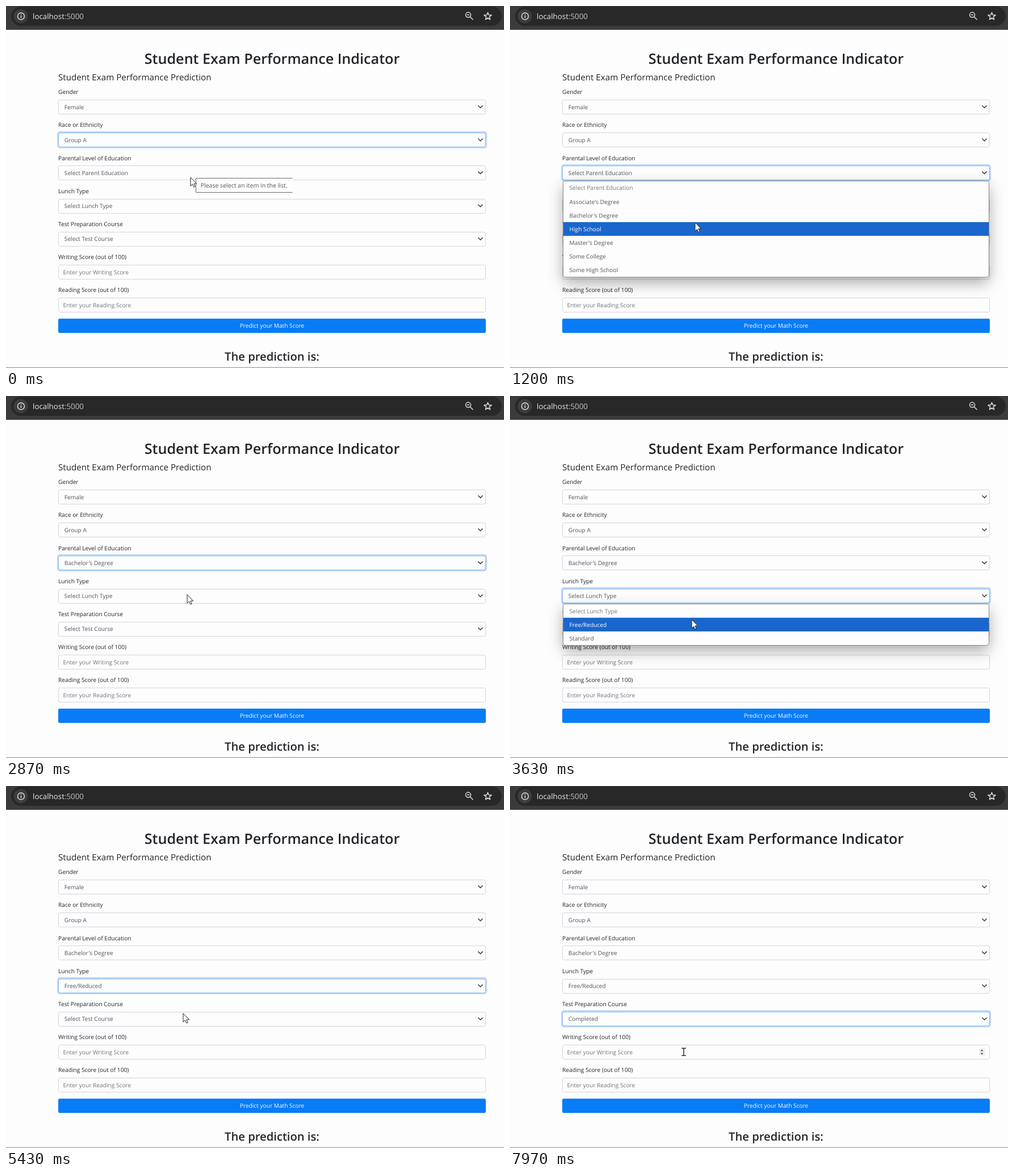
These frames come from a looping animation (877x638 px, 8 s). An HTML page:

```html
<!DOCTYPE html>
<html lang="en">
<head>
<meta charset="utf-8">
<title>Student Exam Performance Indicator</title>
<style>
  html, body { margin: 0; width: 100%; height: 100%; overflow: hidden; background: #fdfdfd; }
  svg { display: block; }
  text { font: 10.2px "Open Sans", "Noto Sans", sans-serif; fill: #212529; text-rendering: geometricPrecision; white-space: pre; }
  .title { font-size: 25.2px; font-weight: 600; text-anchor: middle; }
  .result { font-size: 20.2px; font-weight: 600; text-anchor: middle; }
  .subtitle { font-size: 15.17px; }
  .address { font-size: 13.35px; fill: #e6e6e6; }
  .port { fill: #c4c4c4; }
  .value { fill: #50565c; }
  .hint { fill: #6f757b; }
  .submit { fill: #f4f9ff; text-anchor: middle; }
  .tip { font-size: 10.54px; fill: #555; }
  .box { fill: #fdfdfd; stroke: #d3d5df; }
  .chevron { fill: none; stroke: #343a40; stroke-width: 1.5; stroke-linecap: round; stroke-linejoin: round; }
  .list { filter: drop-shadow(0 10px 13px rgba(0, 0, 0, .32)); }
</style>
</head>
<body>
<svg id="stage" width="877" height="638" viewBox="0 0 877 638">
  <defs><clipPath id="listClip"><path id="clipShape"/></clipPath></defs>

  <rect width="877" height="638" fill="#fdfdfd"/>
  <rect width="877" height="42" fill="#3b3b3d"/>
  <rect x="9" y="1" width="864" height="34" rx="17" fill="#282828"/>
  <circle cx="26" cy="18" r="12.5" fill="#3d3d3d"/>
  <g fill="none" stroke="#dedede" stroke-width="1.5">
    <circle cx="26.5" cy="18" r="6"/>
    <path d="M26.5 17v4.2M26.5 14.4v1.6"/>
    <circle cx="814" cy="15.6" r="4.5"/>
    <path d="M817.3 19l5.2 5.2M811.8 15.6h4.4"/>
    <path id="star" stroke-linejoin="round"/>
  </g>
  <text class="address" x="47" y="23">localhost<tspan class="port">:5000</tspan></text>

  <text class="title" x="468.5" y="102">Student Exam Performance Indicator</text>
  <text class="subtitle" x="92" y="131">Student Exam Performance Prediction</text>
  <g id="form"></g>
  <rect x="92" y="551" width="753" height="25.3" rx="2.7" fill="#087cf7"/>
  <text class="submit" x="468.5" y="567.3">Predict your Math Score</text>
  <text class="result" x="468.5" y="625">The prediction is:</text>
  <rect y="636.6" width="877" height="1.4" fill="#a9a9a9"/>

  <g id="spinner">
    <rect x="826" y="462.5" width="10.5" height="13" fill="#efefef"/>
    <path d="M828.6 467.2l2.4-2.8 2.4 2.8zM828.6 470.8l2.4 2.8 2.4-2.8z" fill="#444"/>
  </g>
  <g id="ring" fill="none">
    <rect x="91.3" y="-1.2" width="754.4" height="27.6" rx="3.6" stroke="#b9d8fd" stroke-width="2.4"/>
    <rect x="92.5" y=".5" width="752" height="24.6" rx="2.7" stroke="#86b9f7"/>
  </g>
  <g id="list"></g>
  <g id="tip">
    <rect x="334.5" y="303.5" width="170" height="25" fill="#fdfdfd"/>
    <path d="M504.5 303.5h-170v25h170" fill="none" stroke="#6c6c6c"/>
    <text class="tip" x="342.7" y="319.7">Please select an item in the list.</text>
  </g>
  <path id="arrow" d="M0 0V15.4L3.5 12.1 5.8 17.2 8.2 16.1 5.9 11.2H10.7Z" fill="#fff" stroke="#222" stroke-width="1" stroke-linejoin="round"/>
  <path id="beam" d="M-4 -6.5h3l1 1 1-1h3M-4 6.5h3l1-1 1 1h3M0 -5.5v11" fill="none" stroke="#111" stroke-width="1.3"/>
</svg>
<script>
const LOOP = 8000, PITCH = 58.17, TOP = 165, ROW = 24.15;
const $ = id => document.getElementById(id);
const show = (id, on) => $(id).setAttribute('display', on ? 'inline' : 'none');
const moveTo = (id, x, y) => $(id).setAttribute('transform', `translate(${x} ${y})`);
const fieldTop = i => TOP + i * PITCH;

const fields = [
  ['Gender', 'Female'],
  ['Race or Ethnicity', 'Group A'],
  ['Parental Level of Education', 'Select Parent Education'],
  ['Lunch Type', 'Select Lunch Type'],
  ['Test Preparation Course', 'Select Test Course'],
  ['Writing Score (out of 100)', 'Enter your Writing Score'],
  ['Reading Score (out of 100)', 'Enter your Reading Score']
];

// Each menu opens, is used and closes on a choice.
const menus = [
  { field: 2, open: 620, close: 2120, pick: 2, options: ['Select Parent Education', "Associate's Degree",
    "Bachelor's Degree", 'High School', "Master's Degree", 'Some College', 'Some High School'] },
  { field: 3, open: 3100, close: 4350, pick: 1, options: ['Select Lunch Type', 'Free/Reduced', 'Standard'] },
  { field: 4, open: 5850, close: 7430, pick: 2, options: ['Select Test Course', 'None', 'Completed'] }
];

// time, x, y of the pointer
const path = [
  [0, 325, 302], [350, 325, 302], [600, 326, 298], [720, 326, 300], [1130, 326, 381.5], [1480, 326, 381.5],
  [1850, 323, 366], [2200, 323, 366], [2650, 319, 350], [3150, 319, 350], [3550, 320, 394], [4450, 320, 394],
  [5100, 312, 400], [5950, 312, 402], [6400, 312, 440], [6700, 312, 440], [7150, 312, 481],
  [7500, 311, 481], [7850, 306, 468.7], [8000, 306, 468.7]
];

$('star').setAttribute('d', 'M' + Array.from({ length: 10 }, (_, i) => {
  const r = i % 2 ? 2.9 : 6.9, a = i * Math.PI / 5;
  return `${848.5 + r * Math.sin(a)} ${18.2 - r * Math.cos(a)}`;
}).join('L') + 'Z');

$('form').innerHTML = fields.map(([label, value], i) => {
  const y = fieldTop(i), select = i < 5;
  return `<text x="92" y="${y - 9.8}">${label}</text>
    <rect class="box" x="92.5" y="${Math.round(y) + .5}" width="752" height="25" rx="2.7"/>
    <text class="${select ? 'value' : 'hint'}" x="${select ? 102.8 : 100.6}" y="${y + 16.8}">${value}</text>
    ${select ? `<path class="chevron" d="M831.8 ${y + 10.8}l3.7 3.7 3.7-3.7"/>` : ''}`;
}).join('');
const values = [...document.querySelectorAll('.value')];

function pointer(t) {
  const i = path.findIndex(p => p[0] > t);
  const [t0, x0, y0] = path[i - 1], [t1, x1, y1] = path[i];
  const u = (t - t0) / (t1 - t0), k = u * u * (3 - 2 * u);
  return [x0 + (x1 - x0) * k, y0 + (y1 - y0) * k];
}

let drawn = '';
function drawList(menu, y) {
  const top = menu ? fieldTop(menu.field) + 27.1 : 0;
  const count = menu ? menu.options.length : 0;
  const hover = Math.max(0, Math.min(count - 1, Math.floor((y - top) / ROW)));
  const key = menu ? menu.field + ':' + hover : '';
  if (key === drawn) return;
  drawn = key;
  if (!menu) { $('list').innerHTML = ''; return; }
  const bottom = top + count * ROW + .4;
  const shape = `M93.5 ${top + 2}q0-2 2-2H841.5q2 0 2 2V${bottom - 5}q0 5-5 5H98.5q-5 0-5-5Z`;
  $('clipShape').setAttribute('d', shape);
  const rows = menu.options.map((name, i) => {
    const on = i === hover;
    const color = on ? (i ? '#fff' : '#eee') : (i ? '#555' : '#777');
    return `<text x="104.5" y="${top + i * ROW + 16}" style="fill:${color}">${name}</text>`;
  }).join('');
  $('list').innerHTML = `<path class="list" d="${shape}" fill="#fdfdfd"/>
    <rect x="93" y="${top + hover * ROW}" width="751" height="${ROW}" fill="${hover ? '#1a66cc' : '#c3c3c3'}" clip-path="url(#listClip)"/>
    <path d="${shape}" fill="none" stroke="#858585"/>${rows}`;
}

function draw(t) {
  const [x, y] = pointer(t);
  const menu = menus.find(m => t >= m.open && t < m.close);
  let focus = 1;
  for (const m of menus) {
    if (t >= m.open) focus = m.field;
    values[m.field].textContent = m.options[t >= m.close ? m.pick : 0];
  }
  const typing = !menu && y > fieldTop(5) && y < fieldTop(5) + 26;
  moveTo('ring', 0, fieldTop(focus));
  drawList(menu, y);
  show('tip', t < 430);
  show('spinner', typing);
  show('arrow', !typing);
  show('beam', typing);
  moveTo('arrow', x, y);
  moveTo('beam', x, y);
}

function tick() {
  draw(performance.now() % LOOP);
  requestAnimationFrame(tick);
}
tick();
</script>
</body>
</html>
```
